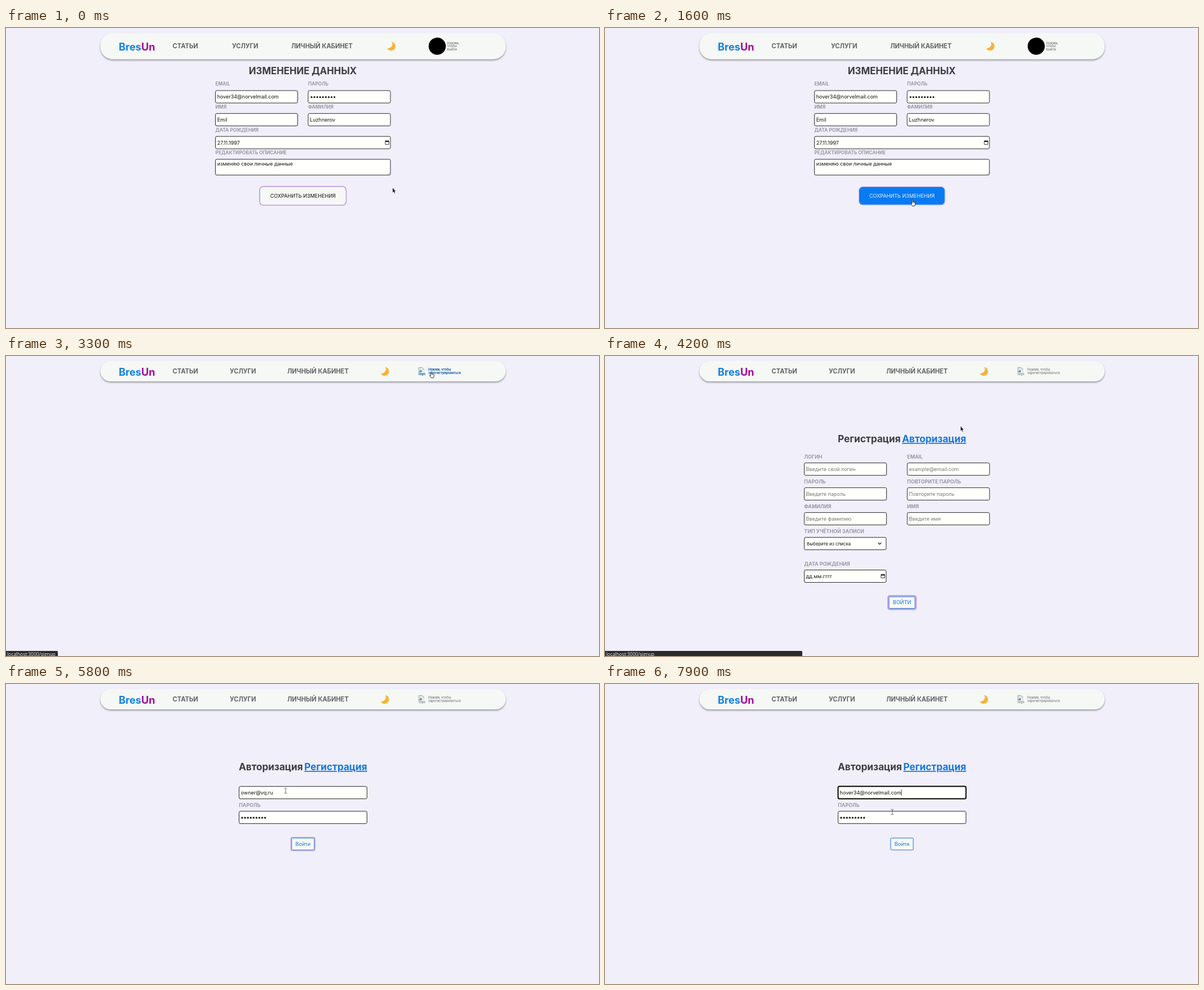
An HTML page that plays this animation: 1052x532 px, repeating every 8000 ms.

```html
<!DOCTYPE html>
<html lang="ru">
<head>
<meta charset="utf-8">
<title>Личный кабинет</title>
<style>
  html, body { margin: 0; width: 100%; height: 100%; overflow: hidden; background: #f0effa; }
  svg { display: block; width: 1052px; height: 532px; font-family: Inter, sans-serif; }
  text { white-space: pre; }
  .bar { fill: #f6f8f6; filter: drop-shadow(0 2px 1.5px rgba(0, 0, 0, .36)); }
  .brand { font-weight: 700; font-size: 18.2px; }
  .nav { font-weight: 700; font-size: 11.15px; fill: #626266; }
  .tiny { font-weight: 700; font-size: 5.55px; fill: #929297; }
  .title { font-weight: 700; font-size: 17.15px; fill: #3d3d40; }
  .caps { font-size: 16.75px; text-anchor: middle; }
  .link { fill: #1577dc; text-decoration: underline; text-anchor: end; }
  .label { font-weight: 700; font-size: 8.35px; fill: #9a99a4; }
  .big { font-size: 8.9px; }
  .value { font-size: 9px; fill: #111; }
  .hint { font-size: 9px; fill: #77777a; }
  .field { fill: #fffffb; stroke: #2a2a2e; }
  .focused { stroke: #000; stroke-width: 2; }
  .btn { font-size: 9.05px; text-anchor: middle; }
  .status { font: 8.4px "Open Sans", "Noto Sans", sans-serif; fill: #e8e8e8; }
</style>
</head>
<body>
<svg id="stage" viewBox="0 0 1052 532"></svg>
<script>
const LOOP = 8000, STEP = 100, PULSE = 1150;
const MAIL = "hover34@norvelmail.com", ADMIN = "owner@vq.ru";
const stage = document.getElementById("stage");

function add(parent, tag, attrs = {}, content) {
  const el = document.createElementNS("http://www.w3.org/2000/svg", tag);
  for (const k in attrs) el.setAttribute(k, attrs[k]);
  if (content !== undefined) el.textContent = content;
  return parent.appendChild(el);
}
const set = (el, attrs) => { for (const k in attrs) el.setAttribute(k, attrs[k]); };
const show = (el, on) => { el.style.display = on ? "" : "none"; };
const group = (parent = stage) => add(parent, "g");
const text = (g, x, y, cls, s) => add(g, "text", { x, y, class: cls }, s);
const rect = (g, x, y, width, height, rx, attrs) =>
  add(g, "rect", { x, y, width, height, rx, ...attrs });
const field = (g, x, y, w, h = 22) => rect(g, x, y, w, h, 2.5, { class: "field" });

function dots(g, x, y) {
  for (let i = 0; i < 9; i++) add(g, "circle", { cx: x + i * 5.08, cy: y, r: 1.6, fill: "#111" });
}

function calendar(g, x, y) {
  add(g, "path", {
    transform: `translate(${x} ${y})`, fill: "#111", "fill-rule": "evenodd",
    d: "M1.4 0h1v1h2.7v-1h1v1h1.2v6.8h-7.1v-6.8h1.2zM1 3v4h5.4v-4z"
  });
}

function button(g, x, y, w, h, r, label, baseline, stroke, color) {
  const ring = rect(g, x, y, w, h, r, { fill: "none", stroke: "#9c5cc9", "stroke-opacity": .54 });
  const body = rect(g, x, y, w, h, r, { fill: "#f6f8f6", stroke });
  const caption = text(g, x + w / 2, baseline, "btn", label);
  caption.style.fill = color;
  const pulse = size => set(ring, {
    x: x - size / 2 - .5, y: y - size / 2 - .5, width: w + size + 1, height: h + size + 1,
    rx: r + size / 2, "stroke-width": size
  });
  return { body, caption, pulse };
}

function header(height, mid, navX, moonX) {
  const g = group();
  rect(g, 167.5, 9, 719, height, Math.min(22, height / 2), { class: "bar" });
  const brand = text(g, 200, mid + 7.3, "brand", "");
  add(brand, "tspan", { fill: "#1580e4" }, "Bres");
  add(brand, "tspan", { fill: "#a3089c" }, "Un");
  ["СТАТЬИ", "УСЛУГИ", "ЛИЧНЫЙ КАБИНЕТ"].forEach((s, i) => text(g, navX[i], mid + 4, "nav", s));
  add(g, "path", {
    transform: `translate(${moonX} ${mid - 7.8})`, fill: "#f9b233",
    d: "M8.3 .3A7.7 7.7 0 1 1 .3 11.3A7.4 7.4 0 0 0 8.3 .3Z"
  });
  return g;
}

// Headers
const memberBar = header(46.5, 32.2, [295.5, 401, 506], 676);
add(memberBar, "circle", { cx: 765, cy: 32.3, r: 15.2, fill: "#000" });
["Нажми,", "чтобы", "выйти"].forEach((s, i) => text(memberBar, 782.5, 28.7 + i * 5.6, "tiny", s));

const guestBar = header(36, 27.2, [295.5, 397, 499], 664.5);
const imageIcon = add(guestBar, "g", { transform: "translate(732 20)" });
add(imageIcon, "path", { d: "M.4 .4H6.5L9 2.9V8.6H.4Z", fill: "#dfe6f5", stroke: "#8d8d92", "stroke-width": .8 });
add(imageIcon, "path", { d: "M.9 8.2L4 4.6L7.2 8.2Z", fill: "#4aa44f" });
add(imageIcon, "path", { d: "M9.2 4L4.8 9H9.2Z", fill: "#f6f8f6" });
const joinText = [
  text(guestBar, 732, 33.8, "tiny", "logo"),
  text(guestBar, 749, 26.2, "tiny", "Нажми, чтобы"),
  text(guestBar, 749, 31.9, "tiny", "зарегистрироваться")
];

// Profile page
const profile = group();
text(profile, 526.5, 82.3, "title caps", "ИЗМЕНЕНИЕ ДАННЫХ");
[[371.5, 102.3, "EMAIL"], [536, 102.3, "ПАРОЛЬ"], [371.5, 143, "ИМЯ"], [536, 143, "ФАМИЛИЯ"],
 [371.5, 183.7, "ДАТА РОЖДЕНИЯ"], [371.5, 224.3, "РЕДАКТИРОВАТЬ ОПИСАНИЕ"]]
  .forEach(([x, y, s]) => text(profile, x, y, "label", s));
for (const x of [371.5, 536]) for (const y of [111, 151.6]) field(profile, x, y, 146);
field(profile, 371.5, 192.2, 310.5);
field(profile, 371.5, 232.8, 310.5, 28);
[[374.7, 125.2, MAIL], [374.7, 166, "Emil"], [539.2, 166, "Luzhnerov"],
 [374.7, 206.6, "27.11.1997"], [374.7, 243.5, "изменяю свои личные данные"]]
  .forEach(([x, y, s]) => text(profile, x, y, "value", s));
dots(profile, 542, 122.6);
calendar(profile, 672.3, 199);
add(profile, "path", { d: "M677 260L681 256M679.5 260L681 258.5", stroke: "#77777a", "stroke-width": .6 });
const saveBtn = button(profile, 451.5, 282.5, 150.5, 30.3, 5.5, "СОХРАНИТЬ ИЗМЕНЕНИЯ", 301, "#f6f8f6", "#111");

// Sign-up page
const signup = group();
text(signup, 413, 153, "title", "Регистрация");
text(signup, 640.7, 153, "title link", "Авторизация");
[[353.3, 181.8, "ЛОГИН", "Введите свой логин"], [536, 181.8, "EMAIL", "example@email.com"],
 [353.3, 225.8, "ПАРОЛЬ", "Введите пароль"], [536, 225.8, "ПОВТОРИТЕ ПАРОЛЬ", "Повторите пароль"],
 [353.3, 269.8, "ФАМИЛИЯ", "Введите фамилию"], [536, 269.8, "ИМЯ", "Введите имя"]]
  .forEach(([x, y, label, hint]) => {
    text(signup, x, y, "label big", label);
    field(signup, x + .2, y + 7.8, 146);
    text(signup, x + 3.3, y + 22.2, "hint", hint);
  });
text(signup, 353.3, 313.8, "label big", "ТИП УЧЁТНОЙ ЗАПИСИ");
field(signup, 353.5, 321.6, 145.3);
text(signup, 358, 336, "value", "Выберите из списка").style.fontSize = "7.9px";
add(signup, "path", { d: "M484.5 331L487.3 334L490.1 331", fill: "none", stroke: "#111", "stroke-width": 1.1 });
text(signup, 353.3, 371.7, "label big", "ДАТА РОЖДЕНИЯ");
field(signup, 353.5, 379.5, 145.3);
text(signup, 356.6, 393.8, "value", "дд.мм.гггг");
calendar(signup, 489.2, 386.3);
const joinBtn = button(signup, 503.9, 427, 46, 20.5, 2, "ВОЙТИ", 440.4, "#2b80d5", "#1976d2");

// Log-in page
const login = group();
text(login, 413, 153, "title", "Авторизация");
text(login, 640.7, 153, "title link", "Регистрация");
const mailField = field(login, 413.5, 181.6, 226.9);
const marker = rect(login, 416.5, 187, 56, 11.4, 0, { fill: "#c62f35" });
const mail = text(login, 416.6, 195.9, "value", ADMIN);
const caret = rect(login, 525, 187.2, .8, 11, 0, { fill: "#111" });
text(login, 413.2, 218, "label big", "ПАРОЛЬ");
field(login, 413.5, 225.6, 226.9);
dots(login, 419, 237.2);
const enterBtn = button(login, 506.8, 273.2, 40, 21, 2, "Войти", 286.9, "#2b80d5", "#1976d2");

// Link preview
const status = group();
const statusBox = rect(status, -4, 523, 96, 14, 2, { fill: "#2b2b2e" });
const statusText = text(status, 2, 531.8, "status", "");

// Pointers
const pointers = { arrow: group(), hand: group(), beam: group() };
add(pointers.arrow, "path", {
  d: "M.4 0V9.3L2.5 7.4L3.9 10.8L5.5 10.1L4.1 6.9H6.6Z", fill: "#151515", stroke: "#fff", "stroke-width": .7
});
add(pointers.hand, "path", {
  d: "M-.9 .8Q0 -.5 .8 .8V4Q1.7 3.3 2.4 4.3Q3.3 3.8 3.8 4.8Q4.8 4.5 4.8 5.7V8Q4.6 9.4 3.8 10.8H-.3Q-1.8 8.6 -3.1 6.8Q-3 5.4 -.9 6.7Z",
  fill: "#fff", stroke: "#151515", "stroke-width": .9, "stroke-linejoin": "round"
});
add(pointers.beam, "path", {
  d: "M-2.3 -4.5H-.6L0 -4L.6 -4.5H2.3M0 -4V4M-2.3 4.5H-.6L0 4L.6 4.5H2.3",
  fill: "none", stroke: "#55555a", "stroke-width": .9
});

// time, x, y
const path = [
  [0, 685.3, 283], [300, 655, 287], [700, 566, 303], [900, 545.5, 305], [2500, 545.5, 305],
  [2900, 660, 158], [3200, 754.5, 28], [3600, 754.5, 28], [3900, 712, 62], [4200, 630.3, 124],
  [4500, 602, 145], [4900, 592, 150], [5200, 574.8, 166], [5400, 548, 184], [6000, 470, 192],
  [6300, 462, 190], [6600, 463.5, 184], [6900, 392, 191], [7200, 440, 204], [7900, 509.5, 227]
];

function pointerAt(t) {
  const i = path.findIndex(p => p[0] > t);
  if (i < 0) return path[path.length - 1].slice(1);
  const [a, b] = [path[i - 1], path[i]], k = (t - a[0]) / (b[0] - a[0]);
  return [a[1] + (b[1] - a[1]) * k, a[2] + (b[2] - a[2]) * k];
}

const ringSize = (t, peak) => 1.25 * (1 + Math.cos((t - peak) / PULSE * 2 * Math.PI));
const within = (t, from, to) => t >= from && t < to;

function render(t) {
  const [x, y] = pointerAt(t);
  const onProfile = t < 1700, onLogin = t >= 4900;
  show(memberBar, onProfile);
  show(profile, onProfile);
  show(guestBar, !onProfile);
  show(signup, within(t, 3800, 4900));
  show(login, onLogin);

  const onSave = onProfile && within(x, 451, 603) && y > 281;
  set(saveBtn.body, { fill: onSave ? "#087bf3" : "#f6f8f6", stroke: onSave ? "#087bf3" : "#f6f8f6" });
  saveBtn.caption.style.fill = onSave ? "#e9f2fc" : "#111";
  saveBtn.pulse(.8 + .4 * ringSize(t, 0));
  joinBtn.pulse(ringSize(t, 4200));
  enterBtn.pulse(ringSize(t, 6620 + PULSE / 2));

  const onJoin = within(t, 3200, 3900);
  joinText.forEach(el => { el.style.fill = onJoin ? "#1159aa" : ""; });

  const selected = within(t, 6100, 7400), pasted = t >= 7400;
  mailField.classList.toggle("focused", t >= 5900);
  mail.textContent = pasted ? MAIL : ADMIN;
  mail.style.fill = selected ? "#fbeeee" : "";
  show(marker, selected);
  show(caret, pasted);
  if (onLogin) {
    const width = mail.getComputedTextLength();
    set(marker, { width });
    set(caret, { x: 416.6 + width });
  }

  const onTab = within(t, 4500, 4900);
  show(status, within(t, 3200, 5500));
  set(statusBox, { width: within(t, 4000, 4900) ? 354 : 96 });
  statusText.textContent = "localhost:3000/" + (onTab ? "login" : "signup");

  const kind = onSave || onJoin || within(t, 4500, 5100) ? "hand" : t >= 5500 ? "beam" : "arrow";
  for (const k in pointers) show(pointers[k], k === kind);
  set(pointers[kind], { transform: `translate(${x} ${y})` });
}

const start = performance.now();
function tick() {
  const t = (performance.now() - start) % LOOP;
  render(Math.floor(t / STEP) * STEP);
  requestAnimationFrame(tick);
}
tick();
</script>
</body>
</html>
```
